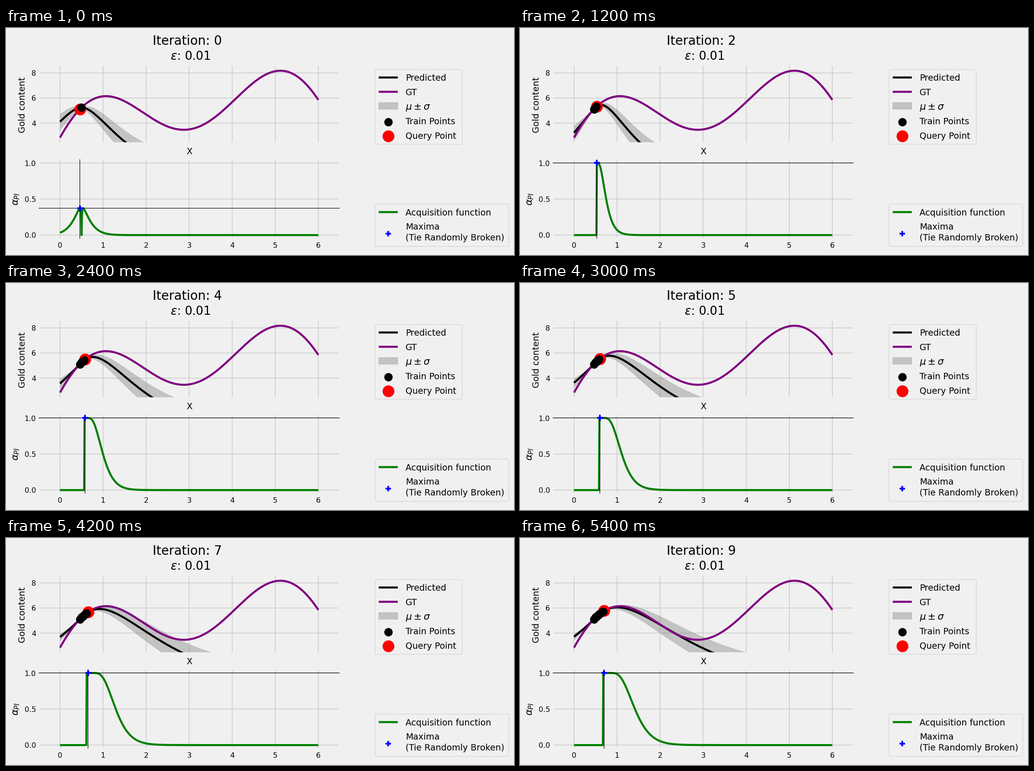
Animation, 1119 px wide and 500 px high, one loop 6000 ms. Source, as a matplotlib script:

```python
import math

import matplotlib.pyplot as plt
import numpy as np
from matplotlib.animation import FuncAnimation
from matplotlib.patches import FancyBboxPatch, Rectangle

W, H, DPI = 1119, 500, 100
BG, GRID = "#f0f0f0", "#cbcbcb"
EPS = 0.01
START = 0.5
QUERIES = [0.46, 0.52, 0.53, 0.56, 0.58, 0.60, 0.61, 0.65, 0.67, 0.70]

plt.rcParams["font.family"] = "DejaVu Sans"
plt.rcParams["mathtext.fontset"] = "dejavusans"
plt.rcParams["lines.solid_capstyle"] = "butt"
plt.rcParams["path.snap"] = False


def pt(px):
    return px * 72 / DPI


def gold(x):
    return 2 + 0.5 * x + 2 * (x - 3) * np.sin(x - 3)


def matern(a, b, length):
    s = math.sqrt(3) * np.abs(np.subtract.outer(a, b)) / length
    return (1 + s) * np.exp(-s)


def log_likelihood(xs, ys, length):
    k = matern(xs, xs, length) + 1e-10 * np.eye(len(xs))
    return -0.5 * ys @ np.linalg.solve(k, ys) - 0.5 * np.linalg.slogdet(k)[1]


def best_length(xs, ys):
    if len(xs) == 1:
        return 1.0
    lengths = np.geomspace(0.1, 10, 800)
    return max(lengths, key=lambda length: log_likelihood(xs, ys, length))


def fit(step):
    """Gaussian process mean, deviation and probability of improvement."""
    xs = np.array([START] + QUERIES[:step])
    ys = gold(xs)
    length = best_length(xs, ys)
    k = matern(xs, xs, length) + 1e-10 * np.eye(len(xs))
    cross = matern(grid_x, xs, length)
    solved = np.linalg.solve(k, cross.T)
    mean = solved.T @ ys
    dev = np.sqrt(np.clip(1 - np.sum(cross.T * solved, axis=0), 1e-12, None))
    z = (mean - ys.max() - EPS) / dev
    chance = np.array([0.5 * math.erfc(-v / math.sqrt(2)) for v in z])
    return xs, ys, mean, dev, chance


grid_x = np.linspace(0, 6, 601)
steps = [fit(i) for i in range(len(QUERIES))]

fig = plt.figure(figsize=(W / DPI, H / DPI), dpi=DPI, facecolor=BG)


def make_axes(top, bottom, ylim, yticks):
    ax = fig.add_axes([72 / W, 1 - bottom / H, 663 / W, (bottom - top) / H],
                      facecolor=BG)
    ax.set(xlim=(-0.4955, 6.4955), ylim=ylim, xticks=range(7), yticks=yticks)
    ax.tick_params(length=0, labelbottom=False, labelleft=False)
    ax.set_axisbelow(True)
    ax.grid(color=GRID, lw=pt(1.6))
    for spine in ax.spines.values():
        spine.set(color=BG, linewidth=pt(4.6))
    return ax


def dots(ax, marker, color, size, z):
    return ax.plot([], [], marker, color=color, ms=pt(size), mew=0, zorder=z)[0]


upper = make_axes(81, 254, (2.39, 8.65), [4, 6, 8])
lower = make_axes(289.3, 464.1, (-0.05, 1.05), [0, 0.5, 1])
sheet = fig.add_axes([0, 0, 1, 1], zorder=5)
sheet.set(xlim=(0, W), ylim=(H, 0))
sheet.axis("off")


def label(x, y, text, size=19.2, ha="left", **kw):
    return sheet.text(x, y, text, fontsize=pt(size), ha=ha,
                      va=kw.pop("va", "baseline"), color="black", **kw)


def legend_box(x0, y0, x1, y1):
    sheet.add_patch(FancyBboxPatch(
        (x0 + 4, y0 + 4), x1 - x0 - 8, y1 - y0 - 8,
        boxstyle="round,pad=4,rounding_size=4",
        fc=BG, ec="#d5d5d5", lw=pt(1.3)))


def legend_line(y, color):
    sheet.plot([821, 863], [y, y], color=color, lw=pt(4.5))


# Labels and ticks
title = label(399.5, 37, "", 27.5, "center")
label(406, 70, r"$\epsilon$: 0.01", 26, "center")
label(404, 278.5, "X", ha="center")
label(36.5, 169, "Gold content", ha="center", va="center", rotation=90)
label(23, 377, r"$\alpha_{PI}$", 21, "center", va="center", rotation=90)
for value in range(7):
    label(119 + 94.83 * value, 484.5, str(value), 16, "center")
for text, y in [("8", 99), ("6", 154.3), ("4", 209.5),
                ("1.0", 298), ("0.5", 377.3), ("0.0", 456.5)]:
    label(66, y + 6, text, 16, "right")

# Legends
legend_box(813, 91.5, 1005, 256)
legend_box(813, 388, 1107.5, 481)
for text, y in [("Predicted", 116), ("GT", 147.5), ("Train Points", 212.5),
                ("Query Point", 244), ("Acquisition function", 413),
                ("Maxima", 444.5), ("(Tie Randomly Broken)", 468.5)]:
    label(880, y, text)
label(880, 180, r"$\mu \pm \sigma$", 21)
legend_line(109, "black")
legend_line(140.5, "purple")
legend_line(405.5, "green")
sheet.add_patch(Rectangle((821, 164), 42, 15, color="gray", alpha=0.4, lw=pt(0.8)))
for y, marker, color, size in [(206.5, "o", "black", 18.5), (238, "o", "red", 26),
                               (453, "P", "blue", 12.5)]:
    dots(sheet, marker, color, size, 3).set_data([842], [y])

# Animated parts
mean_line, = upper.plot([], [], color="black", lw=pt(4.5), zorder=2)
upper.plot(grid_x, gold(grid_x), color="purple", lw=pt(4.5), zorder=2.1)
query_dot = dots(upper, "o", "red", 26, 3)
train_dots = dots(upper, "o", "black", 18.5, 4)
chance_line, = lower.plot([], [], color="green", lw=pt(4.5), zorder=2)
cross_v = lower.axvline(0, color="black", lw=pt(1.2), zorder=3)
cross_h = lower.axhline(0, color="black", lw=pt(1.2), zorder=3)
peak_mark = dots(lower, "P", "blue", 13, 4)
bands = []


def draw(step):
    xs, ys, mean, dev, chance = steps[step]
    query = QUERIES[step]
    peak = np.interp(query, grid_x, chance)
    while bands:
        bands.pop().remove()
    bands.append(upper.fill_between(grid_x, mean - dev, mean + dev, color="gray",
                                    alpha=0.4, lw=pt(0.8), zorder=1))
    title.set_text(f"Iteration: {step}")
    mean_line.set_data(grid_x, mean)
    train_dots.set_data(xs, ys)
    query_dot.set_data([query], [gold(query)])
    chance_line.set_data(grid_x, chance)
    cross_v.set_xdata([query, query])
    cross_h.set_ydata([peak, peak])
    peak_mark.set_data([query], [peak])
    return []


anim = FuncAnimation(fig, draw, frames=len(QUERIES), interval=600,
                     init_func=lambda: draw(0), repeat=True, repeat_delay=0)
plt.show()
```
